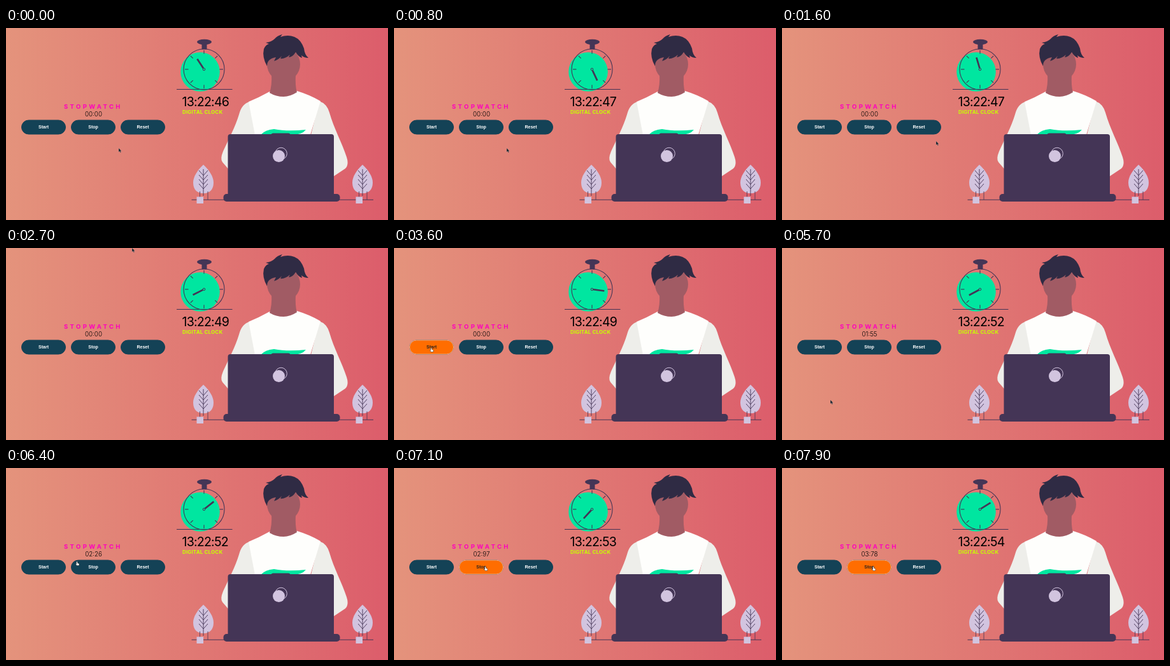
Write an HTML page that moves like this. It is 600 px wide and 302 px high and loops after 8000 ms.

```html
<!DOCTYPE html>
<html lang="en">
<head>
<meta charset="utf-8">
<title>Stopwatch</title>
<style>
  html, body { margin: 0; height: 100%; overflow: hidden; }
  svg { display: block; width: 100vw; height: 100vh; }
  text { font-family: Inter, "Open Sans", sans-serif; }
  .button text { font: bold 7px "Liberation Sans", Arial, sans-serif; text-anchor: middle; fill: #fff; }
  .button .over text { fill: #2b211c; }
  .ink { fill: #443556; }
  .line { fill: none; stroke: #443556; }
  .pale { fill: #d2c4df; }
  .skin { fill: #a15b64; }
  .sleeve { fill: #eeeeea; }
</style>
</head>
<body>
<svg viewBox="0 0 600 302" preserveAspectRatio="none">
  <defs>
    <linearGradient id="sky">
      <stop stop-color="#e4937c"/>
      <stop offset="1" stop-color="#dc5d6b"/>
    </linearGradient>
    <g id="plant">
      <path class="pale" d="M0-55C9-47 16-36 16-27C16-15 9-10 0-10S-16-15-16-27C-16-36-9-47 0-55Z"/>
      <path id="veins" class="line" stroke-width=".9"/>
      <path class="line" stroke-width=".8" d="M-5.500-13V-4M7-13V0"/>
      <rect class="pale" x="-10.500" y="-4.500" width="10.500" height="10.500"/>
    </g>
  </defs>
  <rect width="600" height="302" fill="url(#sky)"/>

  <!-- person -->
  <path class="sleeve" d="M382 116Q370 120 366 136C360 156 349 176 341 194Q336 206 340 211L352 225L394 180Z"/>
  <path class="sleeve" d="M492 115Q504 119 508 133C515 158 528 181 535 203Q539 215 533 221L512 235L476 180Z"/>
  <path fill="#fefefc" d="M414 100Q398 109 381 116L391 168H478L494 115Q477 105 457 99Z"/>
  <path class="skin" d="M417 72H455Q454 92 457 101Q446 108 436 108Q424 108 414 102Q418 90 417 72Z"/>
  <ellipse class="skin" cx="436" cy="57" rx="26" ry="27"/>
  <path fill="#2f2b44" d="M410 60Q402 46 405 33Q408 26 413 25L408 23Q417 22 422 17Q426 12 434 10L431 14Q443 10 453 14Q463 18 468 32Q469 42 475 47Q468 47 464 43L465 47Q459 45 455 38Q450 46 444 46L446 42Q438 49 431 48L433 44Q428 50 421 52L424 46Q417 47 413 51Q410 54 410 60Z"/>
  <path fill="#00e6a0" d="M400 168Q407 160 421 159Q442 163 471 160Q465 168 449 168Z"/>
  <path class="ink" d="M416 168Q417 165 420 165.500H443Q446 165 447 168Z"/>

  <!-- laptop and plants -->
  <path class="line" d="M291.500 270.200H345M520 270.200H577"/>
  <rect class="ink" x="348.500" y="167" width="166.500" height="105" rx="4"/>
  <rect class="ink" x="341.500" y="261" width="183" height="12" rx="5"/>
  <circle class="pale" cx="428.500" cy="201.500" r="9.500"/>
  <circle cx="432" cy="197.500" r="9.300" fill="none" stroke="#d2c4df"/>
  <use href="#plant" x="310" y="270"/>
  <use href="#plant" x="560" y="270"/>

  <!-- dial -->
  <circle cx="305" cy="69" r="30.800" fill="#00e6a0"/>
  <path class="line" stroke-width="1.200" d="M268 96.500H355.500"/>
  <circle class="line" cx="311" cy="65" r="32" stroke-width="1.100"/>
  <ellipse class="ink" cx="311.500" cy="22" rx="11.500" ry="4.200"/>
  <rect class="ink" x="307.500" y="24" width="8" height="9.500"/>
  <g id="ticks" class="line" stroke-width="1.100"></g>
  <path id="hand" class="line" stroke-width="2.700" d="M0-2V-19.500"/>
  <circle class="line" cx="311" cy="65" r="1.800" fill="#00e6a0"/>

  <text id="clock" x="276.500" y="122.500" font-size="19.600" letter-spacing="-.8"></text>
  <text x="277" y="135" font-size="8" font-weight="700" letter-spacing=".15" fill="#c8ff00">DIGITAL CLOCK</text>
  <text x="91" y="126.800" font-size="9.500" font-weight="700" letter-spacing="3.400" fill="#ff00bd">STOPWATCH</text>
  <text id="lap" x="137.500" y="138.600" font-size="9.800" font-weight="300" text-anchor="middle"></text>
  <g id="buttons"></g>

  <path id="arrow" d="M0 0V6L1.500 4.700L2.600 7L3.600 6.500L2.600 4.400H4.400Z" fill="#15212b" stroke="#b9a6a6" stroke-width=".3"/>
  <path id="finger" d="M-1.500-3.500Q-.500-4.500 .300-3.500V-1.500L2.500-.800Q3.500 0 2.500 2.500H-1L-2.500 0Q-2.500-1-1.500 0Z" fill="#fff" stroke="#222" stroke-width=".5"/>
</svg>
<script>
const LOOP = 8000, STEP = 100, TURN = 1500, LAP_START = 4090;
const $ = id => document.getElementById(id);
const pad = n => String(n).padStart(2, "0");
const ramp = (t, start, length) => Math.max(0, Math.min(1, (t - start) / length));

// Stops of the pointer: time, x, y.
const stops = [
  [900, 177, 189], [1200, 200, 250], [1600, 242, 178], [2000, 386, 200], [2700, 198, 0],
  [3500, 59, 161], [4200, 59, 161], [4600, 76, 239], [5800, 76, 239], [6400, 112, 151], [7000, 144, 159]
];

function pointer(t) {
  let [, x, y] = stops[0];
  for (let i = 1; i < stops.length; i++) {
    const [from] = stops[i - 1], [to, nextX, nextY] = stops[i];
    const k = ramp(t, from, to - from), ease = k * k * (3 - 2 * k);
    x += (nextX - x) * ease;
    y += (nextY - y) * ease;
  }
  return [x, y];
}

const veins = [-38, -31, -24, -17].map(y => `M-7 ${y - 8}L0 ${y}L7 ${y - 8}`);
$("veins").setAttribute("d", "M0-48V-6" + veins.join(""));

$("ticks").innerHTML = Array.from({ length: 8 }, (_, i) =>
  `<path d="M0-24.500V-30" transform="translate(311 65) rotate(${i * 45})"/>`).join("");

$("buttons").innerHTML = ["Start", "Stop", "Reset"].map((name, i) => {
  const face = (fill, stroke) =>
    `<rect x="24.500" y="145" width="69" height="22" rx="11" fill="${fill}" stroke="${stroke}"/>
     <text x="59" y="157.800">${name}</text>`;
  return `<g class="button" transform="translate(${i * 78} 0)">${face("#144256", "#144256")}
    <g class="over" opacity="0">${face("#ff6d00", "#f3b08b")}</g></g>`;
}).join("");
const over = document.querySelectorAll(".over");

function draw(now) {
  const t = Math.floor(now % LOOP / STEP) * STEP;
  const elapsed = t - 60 * Math.sin(Math.PI * t / 9000);
  $("hand").setAttribute("transform", `translate(311 65) rotate(${360 * elapsed / TURN - 33})`);
  $("clock").textContent = "13:22:" + (46 + Math.floor((elapsed + 370) / 1000));

  const lap = Math.max(0, Math.floor((elapsed - LAP_START) / 10));
  $("lap").textContent = pad(Math.floor(lap / 100)) + ":" + pad(lap % 100);

  over[0].setAttribute("opacity", ramp(t, 3200, 300) - ramp(t, 4200, 300));
  over[1].setAttribute("opacity", ramp(t, 6400, 300));

  const [x, y] = pointer(t);
  const pointing = t >= 3300 && t < 4300 || t >= 6400;
  for (const [id, shown] of [["arrow", !pointing], ["finger", pointing]]) {
    $(id).setAttribute("transform", `translate(${x} ${y})`);
    $(id).setAttribute("visibility", shown ? "visible" : "hidden");
  }
}

const began = performance.now();
function tick() {
  draw(performance.now() - began);
  requestAnimationFrame(tick);
}
tick();
</script>
</body>
</html>
```
